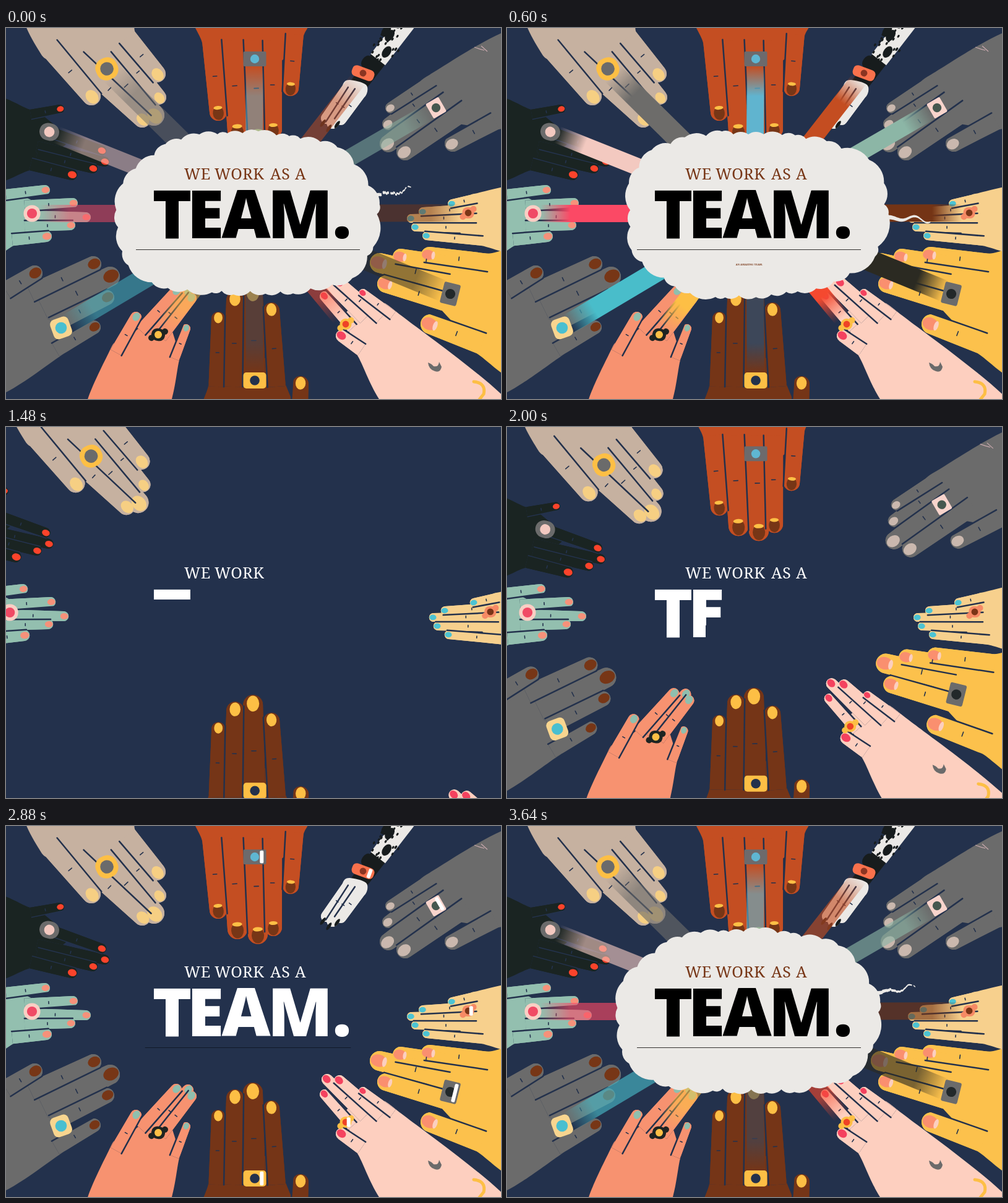
These frames come from a looping animation (800x600 px, 3.68 s). An HTML page:

```html
<!DOCTYPE html>
<html lang="en">
<head>
<meta charset="utf-8">
<title>We work as a team</title>
<style>
html, body { margin: 0; width: 100%; height: 100%; overflow: hidden; background: #23314c; }
svg { display: block; width: 800px; height: 600px; }
.slab { font: 300 25px "Noto Serif", serif; letter-spacing: .55px; }
.big { font: 800 109px "Open Sans", "Noto Sans", sans-serif; text-anchor: middle; }
.tiny { font: 700 4.2px "Noto Serif", serif; }
</style>
</head>
<body>
<svg id="stage" viewBox="0 0 800 600"></svg>
<script>
const LOOP = 3680, CUT = 1200, CX = 400, CY = 300;
const NAVY = '#23314c', PALE = '#ebe9e6', GOLD = '#fdbf45', GRAY = '#6b6b6b', BROWN = '#773616';
const clamp = v => Math.max(0, Math.min(1, v));
const mix = (a, b, k) => a + (b - a) * k;
const easeOut = (k, n = 3) => 1 - Math.pow(1 - clamp(k), n);
const rnd = n => { const v = Math.sin(n * 12.9898) * 43758.5453; return v - Math.floor(v); };
const add = (p, v, k) => [p[0] + v[0] * k, p[1] + v[1] * k];
const lerp = (p, q, k) => [mix(p[0], q[0], k), mix(p[1], q[1], k)];
const set = (el, o) => { for (const k in o) el.setAttribute(k, o[k]); };

// closed Catmull-Rom curve
function smooth(p) {
  const at = i => p[(i + p.length) % p.length];
  return 'M' + p[0] + p.map((b, i) => {
    const a = at(i - 1), c = at(i + 1), e = at(i + 2);
    return `C${add(b, [c[0] - a[0], c[1] - a[1]], 1 / 6)} ${add(c, [e[0] - b[0], e[1] - b[1]], -1 / 6)} ${c}`;
  }).join('') + 'Z';
}
const oval = ([x, y], rx, ry, turn, fill) =>
  `<ellipse rx="${rx}" ry="${ry}" transform="translate(${x} ${y}) rotate(${turn})" fill="${fill}"/>`;

// wrist: both edges; fingers: tip x y, base x y, radius; ring: x y width height corner turn
const hands = [
  { skin: '#c6b1a0', nail: '#f6cf83', start: 1277, wrist: [34, -40, 190, -40],
    fingers: ['138 110 70 30 15', '220 147 115 50 14', '239 141 150 45 17', '247 112 180 30 12', '244 74 195 15 14'],
    ring: [163, 66, 36, 36, 16, -25], band: GOLD, mark: GRAY, ray: '#6d6c6a' },
  { skin: '#1a2422', nail: '#fb432b', ink: '#24334f', start: 1359, wrist: [-30, 116, -30, 244],
    fingers: ['87 131 40 140 7', '154 198 75 170 8', '159 216 50 192 8', '140 227 50 205 8', '106 237 40 220 9'],
    ring: [70, 168, 32, 28, 14, 15], band: GRAY, mark: '#f3c9c0', ray: '#f3c9c0' },
  { skin: '#93bfaf', nail: '#f6917a', start: 1277, wrist: [-30, 258, -30, 366],
    fingers: ['63 262 0 270 8', '108 283 30 288 8', '129 306 30 304 8', '104 319 30 320 8', '65 337 10 342 9'],
    ring: [42, 300, 27, 27, 13, 0], band: '#f9cfc4', mark: '#f04a65', ray: '#fb4965' },
  { skin: GRAY, nail: BROWN, start: 1490, wrist: [-40, 440, -40, 598],
    fingers: ['46 397 0 425 13', '141 382 40 430 13', '168 402 60 455 16', '163 436 75 480 12', '142 484 80 520 11'],
    ring: [89, 485, 31, 33, 8, -20], band: '#f8d58f', mark: '#49bfd0', ray: '#49bdca' },
  { skin: '#f79270', nail: '#8fbfae', start: 1490, wrist: [128, 640, 246, 640],
    fingers: ['210 468 178 525 9', '275 426 218 490 9', '294 427 235 495 9', '299 437 250 500 9', '291 486 272 535 7'],
    ring: [246, 496, 22, 20, 9, 10], lobes: true, band: '#1e2422', mark: GOLD, ray: GOLD },
  { skin: '#753517', nail: GOLD, start: 1200, wrist: [320, 650, 464, 650],
    fingers: ['343 470 340 580 11', '370 440 367 580 14', '399 431 401 580 16', '429 457 437 580 13', '476 576 472 650 13'],
    ring: [402, 570, 37, 26, 5, 0], band: GOLD, mark: NAVY, ray: '#3d4759' },
  { skin: '#fdcfbf', nail: '#f4425f', start: 1465, wrist: [645, 640, 830, 630],
    fingers: ['543 498 575 520 10', '515 434 560 485 8', '519 410 580 470 9', '539 412 605 470 9', '577 429 625 465 7'],
    ring: [549, 479, 19, 18, 9, 0], lobes: true, band: GOLD, mark: '#ef4326', ray: '#f4492f',
    extra: `<path d="M682 541q6 2 9 6q8 2 9 -7l4 8q-2 10 -11 7q-10 -3 -11 -14z" fill="${GRAY}"/>
      <path d="M756 572Q776 574 772 592L764 602" fill="none" stroke="${GOLD}" stroke-width="5" stroke-linecap="round"/>` },
  { skin: '#fcc14c', nail: '#fa8f6f', moon: '#fccfbf', start: 1490, wrist: [850, 372, 850, 570],
    fingers: ['684 367 780 380 13', '638 370 720 384 13', '604 380 720 408 16', '614 414 720 445 14', '686 479 770 510 16'],
    ring: [718, 430, 27, 35, 3, 14], band: GRAY, mark: '#22282a', ray: '#2b2a22' },
  { skin: '#f7d08d', nail: '#4cc3d3', start: 1277, wrist: [850, 260, 850, 362],
    fingers: ['721 284 760 276 7', '674 297 760 292 7', '655 308 760 307 7', '662 322 760 323 7', '680 336 770 344 7'],
    ring: [747, 299, 19, 18, 8, 0], lobes: true, band: '#f68a65', mark: '#7b3517', ray: '#743415' },
  { skin: GRAY, nail: '#cab8ae', start: 1490, wrist: [840, 0, 840, 142],
    fingers: ['622 129 690 85 9', '618 155 700 95 10', '618 187 715 115 14', '645 200 745 130 14', '722 187 790 150 13'],
    ring: [695, 129, 24, 27, 2, -30], band: '#f8d4cc', mark: '#46584f', ray: '#8cb6a6',
    extra: '<path d="M757 31q8 3 16 5M768 29l10 9" fill="none" stroke="#c9a9ae" stroke-width="1.2"/>' },
  { skin: PALE, nail: '#171c1d', claws: true, start: 2130, wrist: [555, 84, 582, 92],
    fingers: ['518 146 553 98 9', '528 153 562 102 10', '541 148 572 104 9'],
    ring: [577, 73, 37, 18, 7, 20], band: '#f9714c', mark: '#8b3522', ray: '#c44d21', extra: legArt() },
  { skin: '#c44e22', nail: BROWN, moon: GOLD, start: 1490, wrist: [310, -40, 487, -40],
    fingers: ['343 136 333 20 14', '374 167 366 20 16', '407 175 403 20 16', '432 164 430 20 14', '460 97 466 10 13'],
    ring: [402, 50, 37, 24, 2, 0], band: '#6d6a6c', mark: '#5fb6d2', ray: '#60b4cf' }
];

// spotted leg: a pale stretch with seeded specks between two dark ends
function legArt() {
  const strip = (a, b, fill, w = 23) => {
    const p = lerp([568, 94], [660, -25], a), q = lerp([568, 94], [660, -25], b);
    return `<path d="M${p}L${q}" stroke="${fill}" stroke-width="${w + 16 * a}"/>`;
  };
  let art = strip(0, 1, '#171c1d', 28) + strip(.36, 1, PALE, 24);
  for (let i = 0; i < 40; i++) {
    const at = lerp([592, 62], [654, -18], rnd(i + 3)), big = i % 8 ? 1 : 4;
    art += oval(add(at, [.78, .62], (rnd(i + 50) - .5) * 42), 1.6 * big, 2.6 * big, 35, '#171c1d');
  }
  return art;
}

hands.forEach(h => {
  h.fingers = h.fingers.map(s => {
    const [tx, ty, bx, by, r] = s.split(' ').map(Number), len = Math.hypot(tx - bx, ty - by);
    const dir = [(tx - bx) / len, (ty - by) / len];
    return { tip: [tx, ty], base: [bx, by], r, dir, side: [-dir[1], dir[0]], turn: Math.atan2(dir[1], dir[0]) * 180 / Math.PI };
  });
  const [x, y] = h.ring, d = Math.hypot(x - CX, y - CY);
  h.out = [(x - CX) / d, .75 * (y - CY) / d];
});

// +1 or -1: which side of finger f looks towards finger g
const facing = (f, g) => Math.sign((g.base[0] - f.base[0]) * f.side[0] + (g.base[1] - f.base[1]) * f.side[1]) || 1;

function fingerPath(f) {
  const b = f.r * 1.15, p = (at, r) => add(at, f.side, r);
  return `M${p(f.base, b)}L${p(f.tip, f.r)}A${f.r} ${f.r} 0 0 0 ${p(f.tip, -f.r)}L${p(f.base, -b)}Z`;
}
function palmPath(h) {
  const f = h.fingers, n = f.length - 1, [ax, ay, bx, by] = h.wrist;
  const edge = (a, b) => add(a.base, a.side, -facing(a, b) * a.r * 1.2);
  return smooth([[ax, ay], edge(f[0], f[1]), ...f.map(g => lerp(g.base, g.tip, .3)), edge(f[n], f[n - 1]), [bx, by]]);
}
// crease along the shorter of two neighbouring fingers
function crease(a, b) {
  const ahead = (b.tip[0] - a.tip[0]) * a.dir[0] + (b.tip[1] - a.tip[1]) * a.dir[1];
  const [f, g] = ahead > 0 ? [a, b] : [b, a], s = facing(f, g) * f.r;
  return `M${add(add(f.tip, f.side, s), f.dir, f.r * .5)}L${add(f.base, f.side, s * 1.1)}`;
}
function knuckle(f) {
  const at = lerp(f.base, f.tip, .5);
  return `M${add(at, f.side, -f.r * .2)}L${add(at, f.side, f.r * .25)}`;
}
function nailArt(h, f) {
  if (h.claws) return oval(add(f.tip, f.dir, f.r * 1.1), 7, 2.6, f.turn, h.nail);
  return oval(add(f.tip, f.dir, f.r * .12), f.r * .8, f.r * .63, f.turn, h.nail)
    + (h.moon ? oval(add(f.tip, f.dir, -f.r * .5), f.r * .22, f.r * .5, f.turn, h.moon) : '');
}
function handArt(h) {
  const f = h.fingers, ink = h.ink || NAVY;
  return `<g class="hand">${h.claws ? h.extra : ''}
    <path d="${palmPath(h)}${f.map(fingerPath).join('')}" fill="${h.skin}" fill-rule="nonzero"/>
    ${f.map(g => `<path d="${fingerPath(g)}" fill="${h.skin}"/>`).join('')}${f.map(g => nailArt(h, g)).join('')}
    <g fill="none" stroke="${ink}" stroke-linecap="round"><path d="${f.slice(1).map((g, i) => crease(f[i], g)).join('')}" stroke-width="${h.ink ? 1.4 : 2.5}"/>
    <path d="${f.map(knuckle).join('')}" stroke-width="1.6"/></g>${h.claws ? '' : h.extra || ''}</g>`;
}
function ringArt(h) {
  const [x, y, w, hh, r, a] = h.ring;
  const lobe = s => oval([s * w * .45, -s * hh * .35], 5, 5, 0, h.band);
  return `<g class="ring"><g transform="translate(${x} ${y}) rotate(${a})">${h.lobes ? lobe(1) + lobe(-1) : ''}
    <rect x="${-w / 2}" y="${-hh / 2}" width="${w}" height="${hh}" rx="${r}" fill="${h.band}"/>
    <circle r="${Math.min(w, hh) * .3}" fill="${h.mark}"/><rect class="glint" rx="2" width="6" y="${-hh * .43}" height="${hh * .86}" fill="#fff"/></g></g>`;
}
function fade(h, i) {
  const [x, y] = h.ring, k = 60 / Math.hypot(CX - x, CY - y);
  return `<linearGradient id="fade${i}" gradientUnits="userSpaceOnUse" x1="${x}" y1="${y}" x2="${mix(x, CX, k)}" y2="${mix(y, CY, k)}">
    <stop offset=".2" stop-color="${h.ray}" stop-opacity="0"/><stop offset="1" stop-color="${h.ray}"/></linearGradient>`;
}

// glyph, centre, wipes: x width start length
const letters = [
  ['T', 268.5, [[200, 140, 1400, 370]]],
  ['E', 322.5, [[290, 31, 1660, 300], [321, 40, 1700, 400]]],
  ['A', 388, [[330, 120, 2060, 250]]],
  ['M', 475.5, [[410, 130, 2290, 280]]],
  ['.', 543, [[520, 50, 2560, 120]]]
];
const line = 'WE WORK AS A', words = [[288, 0, 2], [337, 3, 7], [427, 8, 10], [467, 11, 12]];

const stage = document.getElementById('stage');
stage.innerHTML = `<defs>${hands.map(fade).join('')}${letters.map(([, , w], i) =>
    `<clipPath id="wipe${i}">${w.map(([x, ww]) => `<rect class="wipe" x="${x}" y="262" width="${ww}"/>`).join('')}</clipPath>`).join('')}</defs>
  <rect width="800" height="600" fill="${NAVY}"/>
  ${hands.map(handArt).join('')}
  <g id="beams">${hands.map((h, i) => `<line class="beam" x1="${h.ring[0]}" y1="${h.ring[1]}" stroke="url(#fade${i})" stroke-width="${Math.max(28, h.ring[3])}"/>`).join('')}</g>
  ${hands.map(ringArt).join('')}
  <path id="splash" fill="${PALE}"/><path id="cloud" fill="${PALE}"/>
  <g id="intro">${words.map(([x]) => `<text class="slab word" x="${x}" y="245"></text>`).join('')}</g>
  <g id="title">${letters.map(([c, x], i) => `<g clip-path="url(#wipe${i})"><text class="big" x="${x}" y="340">${c}</text></g>`).join('')}</g>
  <line id="rule" y1="358.5" y2="358.5"/>
  <text id="tag" class="tiny" x="369.5" y="383.5" fill="${BROWN}"></text>`;

const all = c => [...stage.querySelectorAll('.' + c)], id = n => document.getElementById(n);
const [handEls, ringEls, glints, beamEls, wordEls, wipeEls] = ['hand', 'ring', 'glint', 'beam', 'word', 'wipe'].map(all);
const wipes = letters.flatMap(l => l[2]);

// rim of a rounded box that drifts right
function rim(a, tc, grow = 1) {
  const c = Math.cos(a), s = Math.sin(a);
  const r = grow / Math.pow(Math.pow(Math.abs(c) / 209, 2.6) + Math.pow(Math.abs(s) / 130, 2.6), 1 / 2.6);
  return [mix(391, 406, clamp(tc / CUT)) + r * c, 301 + r * s];
}
function cloudPath(tc) {
  const N = 38, p = [];
  for (let i = 0; i < N; i++) {
    const a = (i + .6 * rnd(i)) / N * 2 * Math.PI;
    p.push(rim(a, tc, 1 + .025 * Math.sin(3 * a + tc / 300) + .025 * Math.sin(rnd(i + 9) * 6 + tc / 150)));
  }
  return 'M' + p[0] + p.map((a, i) => {
    const b = p[(i + 1) % N], r = .85 * Math.hypot(b[0] - a[0], b[1] - a[1]);
    return `A${r} ${r} 0 0 1 ${b}`;
  }).join('') + 'Z';
}

// tapered, wavy streak that crumbles into flakes
function streak(a, len, w, grow, gone, seed, tc) {
  const N = 30, root = rim(a, tc, .96), dir = [Math.cos(a), Math.sin(a)], side = [-dir[1], dir[0]];
  const at = (i, s, slip) => {
    const u = i / N, wave = Math.sin(u * 13 + seed) * (2 + len * .05) * u;
    const half = (w * .5 * Math.pow(1 - u, 1.4) + 1) * (1 - gone * .4);
    return add(add(root, dir, u * len * grow), side, wave + s * half + slip);
  };
  let d = '';
  for (let i = 0; i < N; i++) {
    if (rnd(seed * 31 + i) < gone) continue;
    const slip = (rnd(seed * 17 + i) - .5) * 16 * gone;
    d += `M${at(i, 1, slip)}L${at(i + 1.1, 1, slip)} ${at(i + 1.1, -1, slip)} ${at(i, -1, slip)}Z`;
  }
  return d;
}
// start and angle of the biggest streak
const bursts = [[-300, 1.03], [100, 2.6], [420, -1.05], [700, .2], [980, 1.08]];
function splashPath(tc) {
  let d = '';
  bursts.forEach(([start, main], b) => {
    const age = tc - start;
    if (age < 0 || age > 440) return;
    const grow = easeOut(age / 160, 2), gone = clamp((age - 240) / 200);
    for (let i = 0; i < 16; i++) {
      const seed = b * 20 + i, a = i / 16 * 2 * Math.PI + (rnd(seed) - .5) * .3, flat = Math.abs(Math.cos(a));
      d += streak(a, 30 + 35 * rnd(seed + 7) + 40 * Math.pow(flat, 6), 3 + 5 * rnd(seed + 5), grow, gone, seed, tc);
    }
    d += streak(main, 120, 28, grow, gone, b, tc);
  });
  return d;
}

function draw(ms) {
  const now = ms % LOOP, t = now < CUT ? now + LOOP : now, tc = t - LOOP;
  const creep = 34 * Math.pow(1 - clamp((t - 1240) / 1560), 2);
  const reach = Math.pow(clamp((tc + 660) / 300), 2);

  hands.forEach((h, i) => {
    const off = creep + 350 * Math.pow(1 - clamp((t - h.start) / 300), 3);
    const transform = `translate(${h.out[0] * off} ${h.out[1] * off})`;
    set(handEls[i], { transform });
    set(ringEls[i], { transform });
    const [x, y, w] = h.ring, g = (t - (x > 380 ? 2760 : 2680)) / 140;
    set(glints[i], { x: mix(-w / 2, w / 2 - 6, clamp(g)), visibility: g > 0 && g < 1 ? 'visible' : 'hidden' });
    set(beamEls[i], { x2: mix(x, CX, reach), y2: mix(y, CY, reach) });
  });
  set(id('beams'), { visibility: reach ? 'visible' : 'hidden', opacity: .75 - .25 * Math.cos(tc * 2 * Math.PI / 240) });

  const size = easeOut((tc + 400) / 150), lit = tc > -350;
  set(id('cloud'), { d: size ? cloudPath(tc) : '', transform: `translate(392 300) scale(${size}) translate(-392 -300)` });
  set(id('splash'), { d: splashPath(tc) });

  const typed = Math.max(0, Math.floor((t - CUT) / 40));
  words.forEach(([, a, b], i) => { wordEls[i].textContent = line.slice(a, Math.max(a, Math.min(b, typed))); });
  wipes.forEach(([, , start, len], i) => {
    const k = clamp((t - start) / len);
    set(wipeEls[i], { height: k < 1 ? 78 * k : 82 });
  });
  set(id('intro'), { fill: lit ? BROWN : '#fff' });
  set(id('title'), { fill: lit ? '#000' : '#fff' });

  const half = 181 * easeOut((t - 2720) / 284);
  set(id('rule'), { x1: 391 - half, x2: 391 + half, stroke: lit ? '#33312f' : '#111a28' });
  id('tag').textContent = 'AN AMAZING TEAM.'.slice(0, Math.max(0, Math.floor((tc - 200) / 20)));
}

const began = performance.now();
function tick() {
  draw(performance.now() - began);
  requestAnimationFrame(tick);
}
tick();
</script>
</body>
</html>
```
